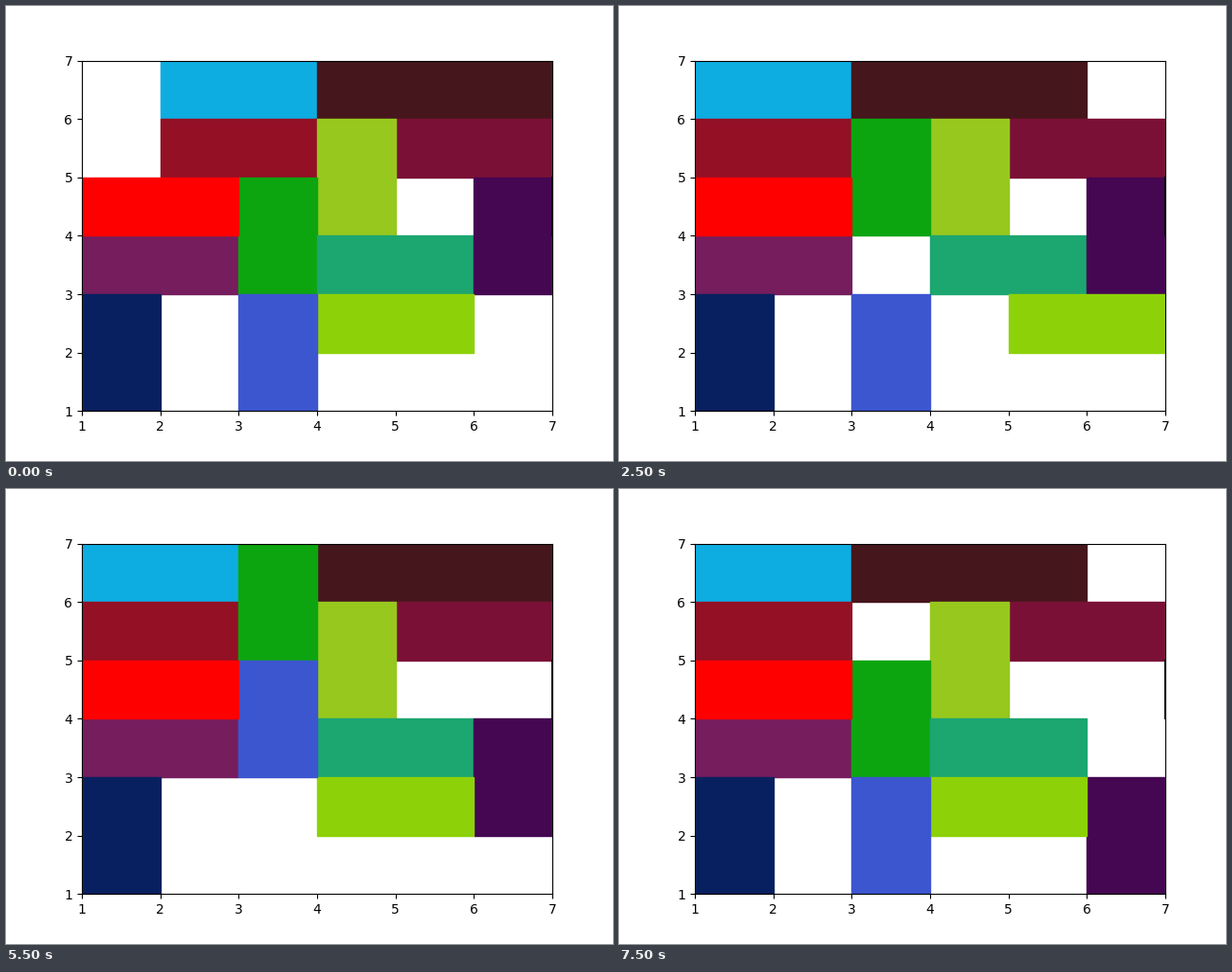
Animation of 640 by 480 pixels, one loop 8000 ms. Source, as a matplotlib script:

```python
import matplotlib.pyplot as plt
from matplotlib.animation import FuncAnimation

STEP_MS = 500

# name: (x, y, width, height, colour), listed from back to front
CARS = {
    "sky": (2, 6, 2, 1, "#0dade2"),
    "brown": (4, 6, 3, 1, "#46161d"),
    "crimson": (2, 5, 2, 1, "#931025"),
    "wine": (5, 5, 2, 1, "#7a1035"),
    "olive": (4, 4, 1, 2, "#97c81e"),
    "plum": (1, 3, 2, 1, "#751d5d"),
    "green": (3, 3, 1, 2, "#0ca510"),
    "teal": (4, 3, 2, 1, "#1ca670"),
    "purple": (6, 3, 1, 2, "#450652"),
    "lime": (4, 2, 2, 1, "#8dd209"),
    "navy": (1, 1, 1, 2, "#08205f"),
    "blue": (3, 1, 1, 2, "#3c56cf"),
    "red": (1, 4, 2, 1, "#ff0000"),
}

# One move per step: (car, dx, dy)
MOVES = [
    ("sky", -1, 0),
    ("brown", -1, 0),
    ("lime", 1, 0),
    ("crimson", -1, 0),
    ("green", 0, 1),
    ("blue", 0, 1),
    ("lime", -1, 0),
    ("brown", 1, 0),
    ("green", 0, 1),
    ("blue", 0, 1),
    ("purple", 0, -1),
    ("blue", 0, -2),
    ("green", 0, -2),
    ("brown", -1, 0),
    ("purple", 0, -1),
]

fig, ax = plt.subplots(figsize=(6.4, 4.8), dpi=100)
ax.set_xlim(1, 7)
ax.set_ylim(1, 7)
ax.set_xticks(range(1, 8))
ax.set_yticks(range(1, 8))

patches = {}
for name, (x, y, w, h, color) in CARS.items():
    patches[name] = ax.add_patch(plt.Rectangle((x, y), w, h, color=color))

# Exit on the right wall
ax.plot([7, 7], [4, 5], color="black")


def draw(step):
    pos = {name: car[:2] for name, car in CARS.items()}
    for name, dx, dy in MOVES[:step]:
        x, y = pos[name]
        pos[name] = (x + dx, y + dy)
    for name, patch in patches.items():
        patch.set_xy(pos[name])
    return list(patches.values())


anim = FuncAnimation(fig, draw, frames=len(MOVES) + 1, interval=STEP_MS,
                     repeat=True, repeat_delay=0, blit=False)
plt.show()
```
